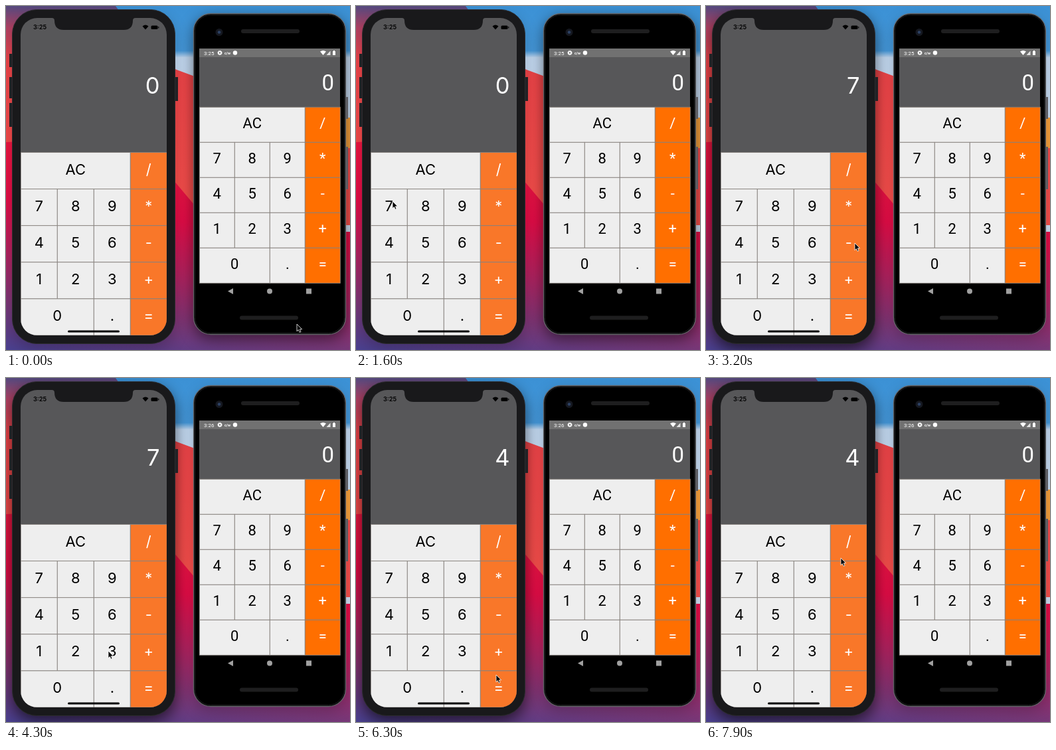
An HTML page that plays this animation: 518x518 px, repeating every 8 s.

```html
<!DOCTYPE html>
<html lang="en">
<head>
<meta charset="utf-8">
<title>Two calculators</title>
<style>
  html, body { margin: 0; width: 100%; height: 100%; overflow: hidden; background: #4a3c84; }
  svg { display: block; width: 100vw; height: 100vh; }
  .ios { font-family: Inter, sans-serif; }
  .android { font-family: Roboto, sans-serif; }
</style>
</head>
<body>
<svg viewBox="0 0 518 518">
  <defs>
    <linearGradient id="sky" x2="0" y2="1">
      <stop offset="0" stop-color="#3b91d5"/><stop offset=".13" stop-color="#4598da"/>
      <stop offset=".15" stop-color="#c3d9f1"/><stop offset="1" stop-color="#d5e2f3"/>
    </linearGradient>
    <linearGradient id="red" x2="0" y2="1">
      <stop offset="0" stop-color="#54497e"/><stop offset=".1" stop-color="#b14163"/>
      <stop offset=".25" stop-color="#ee4449"/><stop offset="1" stop-color="#f7504c"/>
    </linearGradient>
    <linearGradient id="dusk" gradientUnits="userSpaceOnUse" x1="130" y1="210" x2="90" y2="530">
      <stop offset="0" stop-color="#ec1740"/><stop offset=".3" stop-color="#e20d47"/>
      <stop offset=".55" stop-color="#b0225f"/><stop offset=".8" stop-color="#763878"/>
      <stop offset="1" stop-color="#48408f"/>
    </linearGradient>
    <filter id="blur" x="-30%" y="-30%" width="160%" height="160%"><feGaussianBlur stdDeviation="11"/></filter>
    <clipPath id="iosScreen"><rect x="22" y="18" width="220" height="478" rx="25"/></clipPath>
  </defs>

  <!-- wallpaper -->
  <rect width="518" height="518" fill="url(#sky)"/>
  <path d="M0 0H165Q225 85 257 96L284 106L518 190V330H0Z" fill="url(#red)"/>
  <path d="M511 168H518V214H511Z" fill="#f6a03c"/>
  <path d="M0 205Q190 195 257 268L284 300Q400 340 518 340V518H0Z" fill="url(#dusk)"/>

  <!-- the focused window casts the deeper shadow -->
  <rect id="iosShadow" x="9" y="14" width="246" height="504" rx="37" filter="url(#blur)"/>
  <rect id="androidShadow" x="282" y="18" width="230" height="484" rx="26" filter="url(#blur)"/>

  <!-- notched phone -->
  <path d="M5 72h5v20h-5zM5 107h5v32h-5zM5 146h5v36h-5zM254 107h5v36h-5z" fill="#222225"/>
  <rect x="9.5" y="5.5" width="245" height="503" rx="37" fill="#19191b" stroke="#2c2c2f"/>
  <g clip-path="url(#iosScreen)" class="ios">
    <rect x="22" y="18" width="220" height="478" fill="#575759"/>
    <g id="iosKeys"></g>
    <path d="M69 18Q73 18 73 22Q73 36 87 36H177Q191 36 191 22Q191 18 195 18Z" fill="#19191b"/>
    <rect x="93" y="488.5" width="78" height="3" rx="1.5"/>
    <text x="41" y="35.3" font-size="9.2" font-weight="600">3:25</text>
    <path d="M205.5 30.5Q210 26.5 214.5 30.5L210 35.5Z"/>
    <rect x="218.5" y="29.5" width="10" height="5.5" rx="1.5"/>
    <rect x="229.3" y="31" width="1" height="2.5"/>
    <text id="iosTotal" x="231.5" y="132.3" font-size="34.5" text-anchor="end" fill="#fff">0</text>
  </g>

  <!-- square-screen phone -->
  <path d="M511 137h4v33h-4zM511 212h4v64h-4z" fill="#5a5a60"/>
  <rect x="282.5" y="11.5" width="229" height="483" rx="26" stroke="#66676b" stroke-width="1.3"/>
  <rect x="284.5" y="13.5" width="225" height="479" rx="24" fill="none" stroke="#202123"/>
  <rect x="354" y="35" width="88" height="6" rx="3" fill="#1e1e1f"/>
  <rect x="352" y="466.5" width="88" height="6" rx="3" fill="#1e1e1f"/>
  <circle cx="321" cy="39.5" r="5.5" fill="#151820"/>
  <circle cx="321" cy="39.5" r="2.3" fill="#2c4163"/>
  <g class="android">
    <rect x="291" y="64" width="212" height="88" fill="#575759"/>
    <rect x="291" y="64" width="212" height="13" fill="#717171"/>
    <g id="androidKeys"></g>
    <text x="494" y="127" font-size="33" text-anchor="end" fill="#fff">0</text>
    <g fill="#fff">
      <text id="clock" x="298" y="73.6" font-size="8">3:25</text>
      <circle cx="322" cy="70.5" r="2.1" fill="none" stroke="#fff" stroke-width="1.7"/>
      <circle cx="322" cy="70.5" r="3.2" fill="none" stroke="#fff" stroke-dasharray="1.25 1.25"/>
      <text x="329" y="72.8" font-size="5.5" font-weight="700">c/w</text>
      <circle cx="345" cy="70.5" r="3.2"/>
      <path d="M473 68.5Q477.5 65.5 482 68.5L477.5 74Z"/>
      <path d="M482.5 74L488.5 67.5V74Z" opacity=".8"/>
      <path d="M492 68h1v-1h2v1h1v6h-4z"/>
    </g>
  </g>
  <g fill="#a0a0a0">
    <path d="M342 425v9l-8-4.5zM452 425.5h8v8h-8z"/>
    <circle cx="397" cy="429.5" r="4"/>
  </g>

  <path id="cursor" d="M0 0V10.8L2.4 8.6L4.1 12.3L6 11.5L4.4 7.8H7.7Z"
        stroke="#fff" stroke-width=".8" stroke-linejoin="round"/>
</svg>

<script>
const $ = id => document.getElementById(id);

// Each row lists its labels; a label may be followed by its column span.
const ROWS = ["AC:3 /", "7 8 9 *", "4 5 6 -", "1 2 3 +", "0:2 . ="];

function keypad(id, left, top, width, height, orange, baseline) {
  let out = "";
  ROWS.forEach((row, r) => {
    let col = 0;
    for (const key of row.split(" ")) {
      const [label, span = 1] = key.split(":");
      const x = left + col * width, y = top + r * height, w = width * span;
      col += +span;
      const operator = col === 4;
      out += `<rect x="${x}" y="${y}" width="${w}" height="${height}" fill="${operator ? orange : "#eee"}"
        stroke="#88837f" stroke-width=".9"/>
        <text x="${x + w / 2}" y="${y + height / 2 + baseline}" font-size="22" text-anchor="middle"
        fill="${operator ? "#fff" : "#000"}">${label}</text>`;
    }
  });
  $(id).innerHTML = out;
}
keypad("iosKeys", 22.3, 220.5, 55, 55.1, "#f97729", 5.9);
keypad("androidKeys", 291.3, 152.3, 53, 53, "#ff6f00", 5.2);

// Pointer path: time, x, y. It rests only between equal points.
const PATH = [
  [0, 438, 479], [1300, 55, 294], [1600, 55, 294], [2300, 116, 302], [3200, 224, 357],
  [4000, 154, 411], [4700, 154, 411], [5400, 217, 462], [6300, 211, 447],
  [6500, 210, 434], [7000, 215, 380], [7400, 214, 320], [7900, 203, 271]
];
const TOTALS = [[0, "0"], [1700, "7"], [4400, "3"], [5700, "4"]];
const FOCUS_TIME = 1700, MINUTE_TIME = 3700, LOOP = 8000, STEP = 100;

const slope = (i, axis) => (PATH[i + 1][axis] - PATH[i][axis]) / (PATH[i + 1][0] - PATH[i][0]);

// Speed at a point: none at the ends and turning points, else the harmonic mean.
function speed(i, axis) {
  if (i === 0 || i === PATH.length - 1) return 0;
  const a = slope(i - 1, axis), b = slope(i, axis);
  return a * b > 0 ? 2 * a * b / (a + b) : 0;
}

function pointerAt(t) {
  const i = Math.min(PATH.findLastIndex(p => p[0] <= t), PATH.length - 2);
  const span = PATH[i + 1][0] - PATH[i][0], u = (t - PATH[i][0]) / span, v = 1 - u;
  return [1, 2].map(axis =>
    v * v * (1 + 2 * u) * PATH[i][axis] + u * u * (3 - 2 * u) * PATH[i + 1][axis] +
    u * v * span * (v * speed(i, axis) - u * speed(i + 1, axis)));
}

function draw(now) {
  const t = Math.floor(now % LOOP / STEP) * STEP;
  const iosFocused = t >= FOCUS_TIME;
  $("cursor").setAttribute("transform", `translate(${pointerAt(t)})`);
  $("iosTotal").textContent = TOTALS.findLast(v => v[0] <= t)[1];
  $("clock").textContent = t < MINUTE_TIME ? "3:25" : "3:26";
  $("iosShadow").setAttribute("opacity", iosFocused ? .6 : .2);
  $("androidShadow").setAttribute("opacity", iosFocused ? .2 : .5);
  requestAnimationFrame(draw);
}
draw(performance.now());
</script>
</body>
</html>
```
